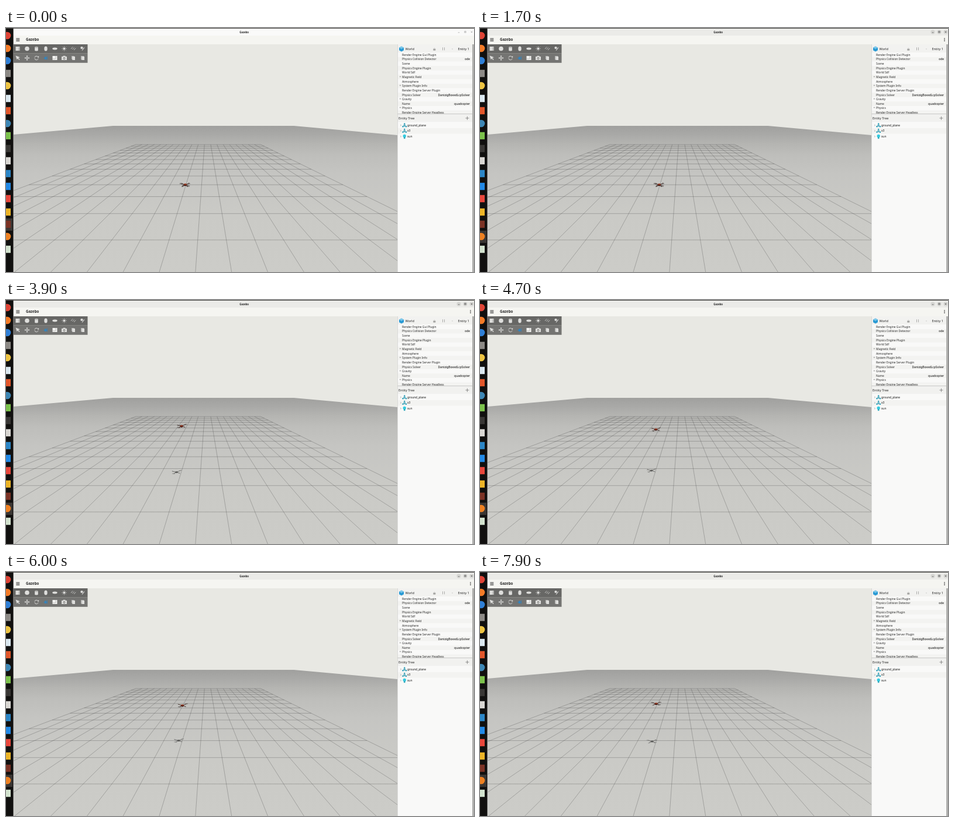
Recreate the animation shown at these times as an HTML page with a canvas. Size 800x419 px, loop 8 s.

```html
<!DOCTYPE html>
<html lang="en">
<head>
<meta charset="utf-8">
<title>Drone take-off</title>
<style>
  html, body { margin: 0; width: 100%; height: 100%; overflow: hidden; background: #fafaf8; }
  canvas { display: block; width: 800px; height: 419px; }
</style>
</head>
<body>
<canvas id="stage" width="800" height="419"></canvas>
<script>
const LOOP = 8000, FOCUS_AT = 1300, LIFT_AT = 1750;
const FONT = '"Noto Sans", "Open Sans", sans-serif';
const HORIZON = 154.3, VANISH_X = 342.5;
const canvas = document.getElementById('stage');
let g;

function rect(x, y, w, h, color) {
  g.fillStyle = color;
  g.fillRect(x, y, w, h);
}

function oval(x, y, rx, ry, color) {
  g.fillStyle = color;
  g.beginPath();
  g.ellipse(x, y, rx, ry, 0, 0, Math.PI * 2);
  g.fill();
}

function ring(x, y, r, color, width = 1, from = 0, to = Math.PI * 2) {
  g.strokeStyle = color;
  g.lineWidth = width;
  g.beginPath();
  g.arc(x, y, r, from, to);
  g.stroke();
}

function trace(pts) {
  g.beginPath();
  for (let i = 0; i < pts.length; i += 2) g.lineTo(pts[i], pts[i + 1]);
}

function line(color, width, ...pts) {
  g.strokeStyle = color;
  g.lineWidth = width;
  trace(pts);
  g.stroke();
}

function poly(color, ...pts) {
  g.fillStyle = color;
  trace(pts);
  g.fill();
}

function text(str, x, y, size, { color = '#262626', align = 'left', weight = 400 } = {}) {
  g.font = `${weight} ${size}px ${FONT}`;
  g.fillStyle = color;
  g.textAlign = align;
  g.textBaseline = 'alphabetic';
  g.fillText(str, x, y + size * 0.36);
}

// Ground plane and perspective grid

const rowY = n => HORIZON + 1 / (0.00477 + 0.001312 * n);
const gridX = (i, y) => VANISH_X + (y - HORIZON) * (0.2335 * i - 0.304);

function drawScene() {
  g.save();
  g.beginPath();
  g.rect(13, 28, 656, 391);
  g.clip();
  rect(13, 28, 656, 391, '#e8e8e3');

  const shade = g.createLinearGradient(0, 168, 0, 419);
  [[0, '#a0a09e'], [0.06, '#a9a9a7'], [0.12, '#b4b4b1'], [0.2, '#bebebb'],
   [0.33, '#c5c5c2'], [0.6, '#cacac6'], [1, '#ccccc8']]
    .forEach(([at, color]) => shade.addColorStop(at, color));
  poly(shade, 13, 183, 183, 168, 492, 168, 669, 184, 669, 419, 13, 419);

  const ink = 'rgba(60,60,60,.5)';
  const top = rowY(13);
  for (let n = 0; n <= 13; n++) {
    const y = rowY(n);
    line(ink, 0.6, gridX(-10, y), y, gridX(10, y), y);
  }
  for (let i = -10; i <= 10; i++) line(ink, 0.6, gridX(i, top), top, gridX(i, 440), 440);
  g.restore();
}

// Toolbar

function drawToolbar() {
  const light = '#dededc', mid = '#b4b4b2', base = '#747472';
  rect(13, 28, 126.5, 15.7, '#676765');
  rect(13, 43.7, 126.5, 16.1, base);

  rect(16.5, 32, 7, 7, light);
  rect(21.5, 33, 2, 6, mid);
  oval(36, 35.5, 3.8, 3.8, light);
  rect(49.2, 33, 5.6, 5.5, light);
  oval(52, 38.3, 2.8, 1.2, light);
  oval(52, 33, 2.8, 1.2, mid);
  rect(65.5, 34, 5, 3, light);
  oval(68, 34, 2.5, 2.5, light);
  oval(68, 37, 2.5, 2.5, light);
  oval(83.5, 35.5, 4.2, 1.9, light);

  oval(99.5, 35.5, 2, 2, light);
  for (let i = 0; i < 8; i++) {
    const c = Math.cos(i * Math.PI / 4), s = Math.sin(i * Math.PI / 4);
    line(light, 0.7, 99.5 + 2.6 * c, 35.5 + 2.6 * s, 99.5 + 4.1 * c, 35.5 + 4.1 * s);
  }
  for (let i = 0; i < 3; i++) line(light, 0.8, 111 + i * 2.6, 36 + i, 114 + i * 2.6, 32.5 + i);
  oval(129.5, 34, 2.2, 2, light);
  line(light, 1.2, 130, 38.5, 134, 33.5);

  poly(light, 16.5, 47.5, 24, 50.3, 21.2, 51.3, 23.6, 54.2, 22.4, 55, 20.2, 52.2, 18.8, 54.5);
  line(light, 1, 32.5, 51.5, 39.5, 51.5);
  line(light, 1, 36, 48, 36, 55);
  [[0, -1], [1, 0], [0, 1], [-1, 0]].forEach(([x, y]) => poly(light,
    36 + x * 4.4, 51.5 + y * 4.4,
    36 + x * 2.6 + y * 1.7, 51.5 + y * 2.6 + x * 1.7,
    36 + x * 2.6 - y * 1.7, 51.5 + y * 2.6 - x * 1.7));
  ring(52, 51.5, 3.2, light, 1, 0.3, 2.9);
  ring(52, 51.5, 3.2, light, 1, 3.4, 6);
  poly(light, 54, 50.4, 56.3, 50.4, 56, 47.8);

  line('#3d7fae', 1.2, 64, 52, 71, 52);
  rect(66, 49.5, 3, 4.5, '#3484bd');
  line('#3d7fae', 1, 70.5, 48.5, 70.5, 54.5);

  rect(79.5, 48, 8, 7, '#f4f4f2');
  line('#8a8a88', 0.5, 79.5, 53, 85, 53, 85, 48);
  rect(95, 49, 9, 6, light);
  rect(97.5, 47.8, 4, 1.5, light);
  oval(99.5, 52, 1.9, 1.9, base);
  oval(99.5, 52, 1.1, 1.1, light);
  rect(112, 48, 4.5, 5.6, mid);
  rect(113.3, 49, 4.7, 6, light);
  rect(128, 48, 5, 6.5, mid);
  rect(129.5, 49, 4.5, 6, light);
}

// Side panel

const COMPONENTS = [
  ['Render Engine Gui Plugin'], ['Physics Collision Detector', 'ode'], ['Scene'],
  ['Physics Engine Plugin'], ['World Sdf'], ['+Magnetic Field'], ['Atmosphere'],
  ['+System Plugin Info'], ['Render Engine Server Plugin'],
  ['Physics Solver', 'DantzigBoxedLcpSolver'], ['+Gravity'], ['Name', 'quadcopter'],
  ['+Physics'], ['Render Engine Server Headless']
];

function modelIcon(x, y) {
  line('#4d9fb4', 0.7, x, y - 2.6, x - 2.8, y + 2.2, x + 2.8, y + 2.2, x, y - 2.6);
  [[0, -2.6], [-2.8, 2.2], [2.8, 2.2], [0, 0.5]].forEach(([dx, dy]) =>
    oval(x + dx, y + dy, 1.2, 1.2, '#2f9fb8'));
}

function drawPanel() {
  rect(669, 28, 128, 391, '#f9f9f8');
  rect(669, 28, 128, 14, '#f2f2f0');
  poly('#2a9ad4', 676, 31.5, 680, 33.7, 680, 38.3, 676, 40.5, 672, 38.3, 672, 33.7);
  poly('#7cc8ea', 676, 31.5, 680, 33.7, 676, 36, 672, 33.7);
  text('World', 682.5, 35.7, 5.5);
  text('Entity 1', 792, 35.7, 5.6, { align: 'right' });
  rect(730.3, 36, 4, 2.6, '#a2a2a0');
  ring(732.3, 36, 1.3, '#a2a2a0', 0.6, Math.PI, Math.PI * 2);
  rect(746, 33.3, 0.8, 5, '#999');
  rect(749, 33.3, 0.8, 5, '#999');
  oval(763, 36, 0.7, 0.7, '#bbb');

  g.save();
  g.beginPath();
  g.rect(669, 42, 128, 105);
  g.clip();
  COMPONENTS.forEach(([label, value], i) => {
    const y = 46 + i * 7.64, nested = label[0] === '+';
    if (i % 2) rect(669, y - 3.8, 128, 7.64, '#f3f3f1');
    if (nested) text('+', 672.5, y, 5, { color: '#555' });
    text(nested ? label.slice(1) : label, 677, y, 4.88);
    if (value) text(value, 793, y, 4.95, { align: 'right', color: '#000' });
  });
  g.restore();

  rect(669, 147, 128, 1.2, '#c9c9c7');
  rect(669, 148.2, 128, 13, '#f1f1ef');
  text('Entity Tree', 671, 155, 5.55);
  line('#777', 0.8, 785.5, 154.8, 791.5, 154.8);
  line('#777', 0.8, 788.5, 151.8, 788.5, 157.8);

  rect(669, 172, 128, 9.5, '#f3f3f1');
  ['ground_plane', 'x3', 'sun'].forEach((name, i) => {
    const y = 167 + i * 9.6;
    line('#8a8a88', 0.6, 674, y - 1.4, 675.5, y, 674, y + 1.4);
    if (i < 2) modelIcon(681.2, y);
    else {
      oval(681.2, y - 0.7, 2.7, 2.7, '#35cbe0');
      rect(679.9, y + 1, 2.6, 3, '#2fa9bd');
    }
    text(name, 686, y, 4.92, { color: '#111' });
  });
  rect(669, 28, 0.7, 391, '#cfcfcd');
  rect(797, 28, 3, 391, '#b0b0ae');
}

// Window frame and dock

const DOCK = [
  [13, 'o', '#df4436'], [35, 'o', '#f47b27'], [56, 'o', '#2f7fd6'], [78, 's', '#8d8a86'],
  [99, 'o', '#eec443'], [121, 's', '#dbe8f0'], [142, 's', '#e2572b'], [164, 'o', '#3e87b5'],
  [185, 's', '#7cc24c'], [207, 's', '#393735'], [228, 's', '#dad8d4'], [250, 's', '#2b86c7'],
  [272, 's', '#2289e6'], [293, 's', '#e8473c'], [316, 's', '#edb527'], [337, 's', '#7c3325'],
  [358, 'o', '#ee8122'], [380, 's', '#d3e3cf']
];

function drawHeader() {
  rect(13, 13, 787, 15, '#f5f5f1');
  text('Gazebo', 34, 20.2, 6.1, { weight: 600 });
  for (let i = 0; i < 3; i++) rect(17.3, 17.6 + i * 2.1, 6, 1, '#333');
}

function drawTitleBar(focused) {
  const ink = focused ? '#444' : '#999';
  rect(13, 0, 787, 13, focused ? '#ebebe8' : '#fafaf9');
  rect(0, 0, 800, 1, '#444340');
  text('Gazebo', 407, 7, 4.3, { align: 'center', weight: 700 });
  if (focused) {
    [774, 785, 796].forEach(x => oval(x, 6.8, 3.6, 3.6, '#d6d6d3'));
    for (let i = -1; i < 2; i++) oval(794, 20.2 + i * 2.1, 0.8, 0.8, '#333');
  }
  line(ink, 0.7, 772.7, 7.8, 775.3, 7.8);
  g.strokeRect(783.9, 5.7, 2.2, 2.2);
  line(ink, 0.7, 794.8, 5.6, 797.2, 8);
  line(ink, 0.7, 797.2, 5.6, 794.8, 8);
}

function drawDock(focused) {
  rect(0, 1, 12.6, 418, '#11100f');
  rect(0, focused ? 348 : 327, 11, 21, '#3a3633');
  DOCK.forEach(([y, kind, color]) => {
    if (kind === 'o') oval(2, y, 6.3, 6.3, color);
    else rect(0, y - 6.2, 8, 12.4, color);
  });
}

// Quadcopter

const rise = t => {
  const s = t - LIFT_AT;
  if (s <= 0) return 0;
  const w = Math.PI / 2120, a = w * 0.4545;
  return 42.3 * (1 - Math.exp(-a * s) * (Math.cos(w * s) + 0.4545 * Math.sin(w * s)));
};

function drawCraft(x, y, tilt, spin, shadow) {
  const arm = shadow ? '#6a6a68' : '#4a3530';
  g.save();
  g.translate(x, y);
  g.rotate(tilt);
  [[-6.8, -2.1], [7, -2.4], [-5, 2.3], [5.4, 2.1]].forEach(([ax, ay], i) => {
    line(arm, 0.9, 0, 0, ax, ay);
    const angle = spin * (i % 2 ? 1 : -1) + i;
    const dx = 2.5 * Math.cos(angle), dy = 0.8 * Math.sin(angle);
    line(shadow ? '#7c7c7a' : '#4d4542', 0.8, ax - dx, ay - dy, ax + dx, ay + dy);
  });
  if (shadow) oval(0, 0, 2.5, 1.5, '#5c5c5a');
  else {
    oval(0, 0.2, 2.8, 1.9, '#5c2018');
    oval(0.2, -0.5, 2, 0.9, '#b04426');
    oval(0, 1, 1.2, 0.8, '#24110e');
  }
  g.restore();
}

function drawQuad(t) {
  const h = rise(t), s = Math.max(0, t - LIFT_AT);
  const spin = s / 37;
  const tilt = -0.12 * Math.min(1, s / 800) * Math.exp(-s / 3500);
  drawCraft(306 - 0.28 * h, 270 + 0.49 * h, tilt, spin, true);
  if (!s) {
    line('#4b302a', 0.8, 303.5, 270, 302, 273);
    line('#4b302a', 0.8, 308.5, 270, 310, 273);
  }
  drawCraft(306.3 - 0.12 * h, 269 - h, tilt, spin, false);
}

const backdrop = document.createElement('canvas');
backdrop.width = 800;
backdrop.height = 419;
g = backdrop.getContext('2d');
rect(0, 0, 800, 419, '#f5f5f1');
drawHeader();
drawScene();
drawToolbar();
drawPanel();
g = canvas.getContext('2d');

const start = performance.now();
function render() {
  const t = (performance.now() - start) % LOOP;
  const step = Math.floor(t / 100) * 100;
  const focused = step >= FOCUS_AT;
  g.drawImage(backdrop, 0, 0);
  drawTitleBar(focused);
  drawDock(focused);
  drawQuad(step);
  requestAnimationFrame(render);
}
render();
</script>
</body>
</html>
```
